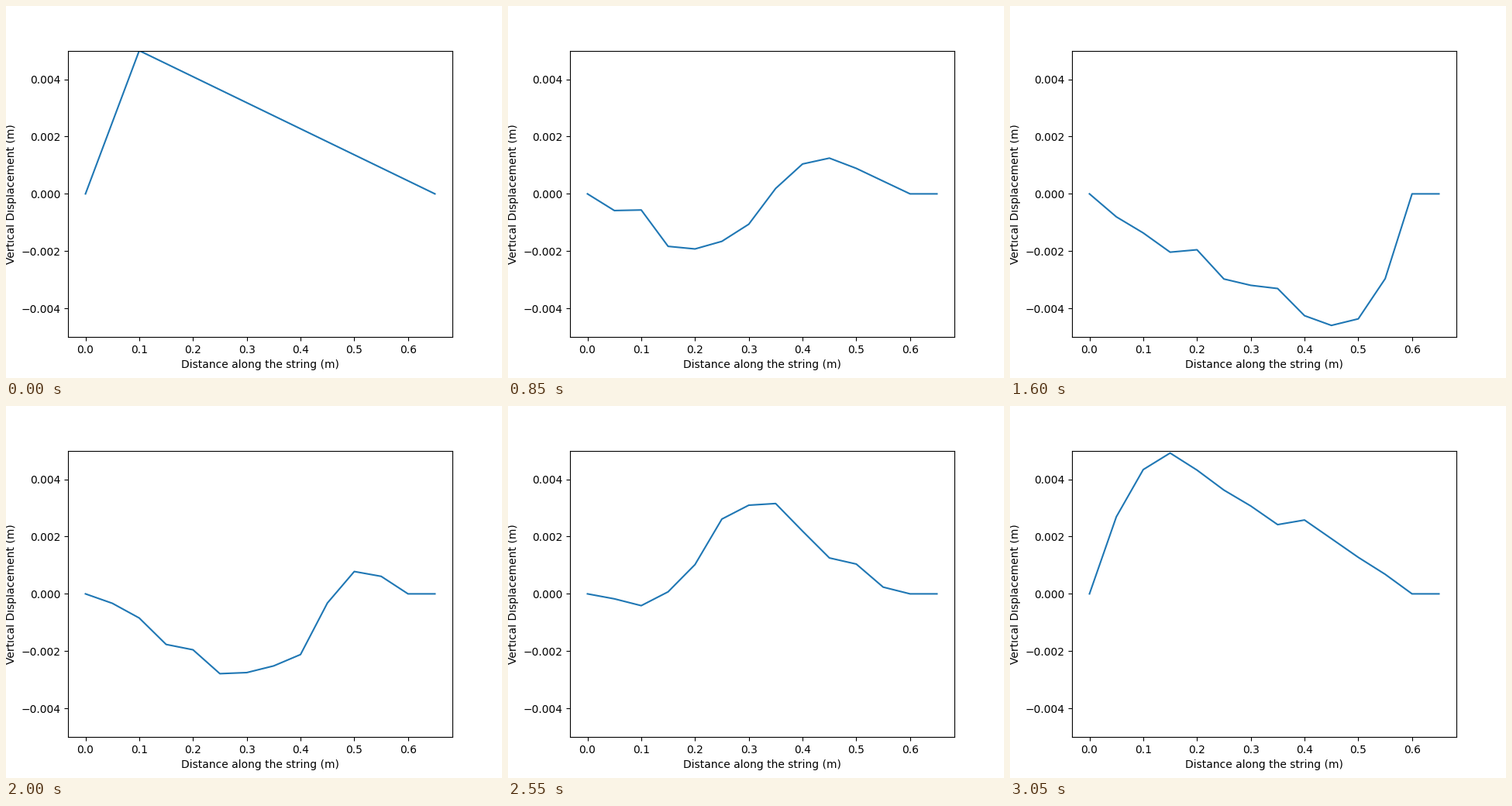
These frames come from a looping animation (640 px wide and 480 px high, 3.1 s). A matplotlib script:

```python
import numpy as np
import matplotlib.pyplot as plt
from matplotlib.animation import FuncAnimation

LENGTH = 0.65      # m
PLUCK_X = 0.1      # m
PLUCK_Y = 0.005    # m
POINTS = 14
STEPS = 62
COURANT_SQ = 0.1611    # (c * dt / dx) ** 2


def simulate():
    """Explicit finite-difference wave equation, released from rest."""
    x = np.linspace(0, LENGTH, POINTS)
    y = np.zeros((STEPS, POINTS))
    y[:2] = np.interp(x, [0, PLUCK_X, LENGTH], [0, PLUCK_Y, 0])
    # The last two points are held at zero once the string is released.
    inner = slice(1, POINTS - 2)
    for n in range(1, STEPS - 1):
        bend = y[n, 2:-1] - 2 * y[n, inner] + y[n, :-3]
        y[n + 1, inner] = 2 * y[n, inner] - y[n - 1, inner] + COURANT_SQ * bend
    return x, y


x, y = simulate()

fig, ax = plt.subplots(figsize=(6.4, 4.8), dpi=100)
line, = ax.plot(x, y[0])
ax.set_ylim(-PLUCK_Y, PLUCK_Y)
ax.set_xlabel("Distance along the string (m)")
ax.set_ylabel("Vertical Displacement (m)")


def update(n):
    line.set_ydata(y[n])
    return line,


anim = FuncAnimation(fig, update, frames=STEPS, interval=50,
                     repeat=True, repeat_delay=0)
plt.show()
```
